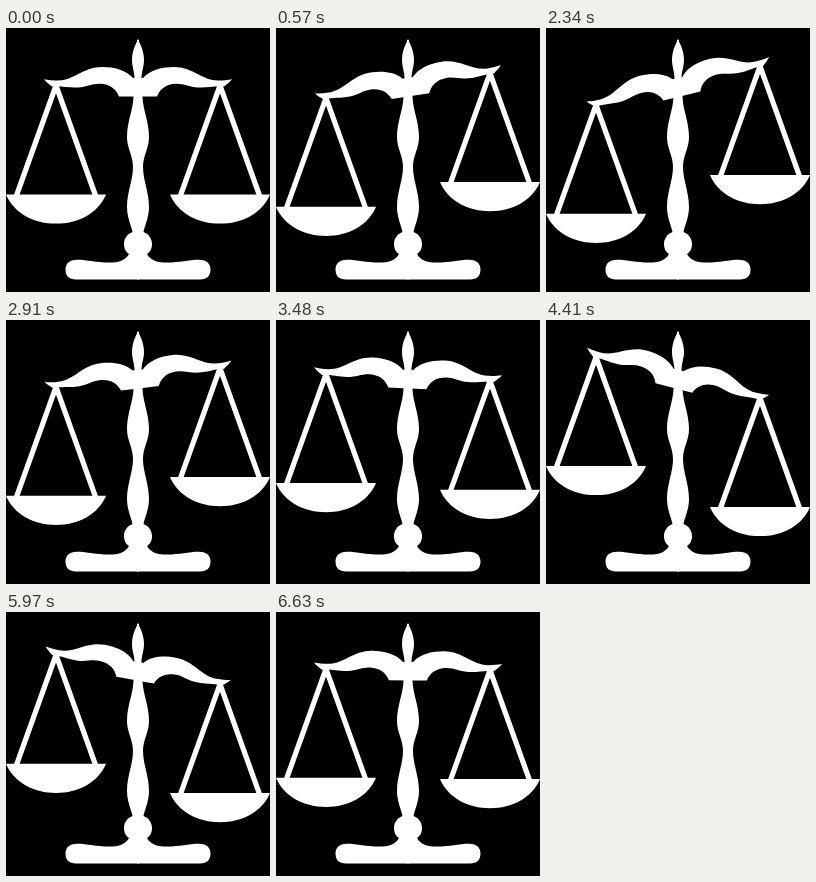
Recreate the animation shown at these times as an HTML page with a canvas. Size 264 by 264 pixels, loop 6.66 s.

```html
<!DOCTYPE html>
<html lang="en">
<head>
<meta charset="utf-8">
<title>Balance scales</title>
<style>
  html, body { margin: 0; width: 100%; height: 100%; overflow: hidden; background: #000; }
  canvas { display: block; width: 100vw; height: 100vh; }
</style>
</head>
<body>
<canvas id="stage" width="264" height="264"></canvas>
<script>
const ctx = document.getElementById('stage').getContext('2d');
const LOOP = 6660, STEP = 30;
const SWING = 17 * Math.PI / 180;
const CX = 132, PIVOT_Y = 52, ARM = 82;

// Left halves, x measured from the centre line.
const beam = new Path2D(`M1 -2 L-5 -2 C-12 -10 -24 -13 -36 -13
  C-55 -13 -64 0.5 -80 0.5 C-85 0.5 -90 0 -94 -0.8 C-92 2 -89 4 -86 6.5
  C-77 5.5 -70 8 -60 7.5 C-51 7 -46 3.5 -38 3.8 C-28 4.2 -22 9 -19 16.4
  L1 16.4 Z`);

const post = new Path2D(`M1 12 L0 11.5 C-3 17 -6 24 -6 32 C-6 38 -4 42 -3.5 49
  L-4.5 69 C-5 82 -11 94 -11 109 C-11 121 -5 127 -5 139
  C-5 152 -11 164 -11 179 C-11 189 -7 197 -5.5 204
  C-11 206 -14 211 -14 216 C-14 221 -12 224 -9 226
  C-13 233 -20 234.5 -29 234.5 C-42 234.5 -50 231.7 -61 231.7
  C-69 231.7 -72.5 236 -72.5 241.5 C-72.5 248 -69 251.5 -62 251.5 L1 251.5 Z`);

const pan = new Path2D(`M-50 109.4 C-42 128.4 -22 138.6 0 138.6 C22 138.6 42 128.4 50 109.4 Z`);
const cords = new Path2D('M-39.7 111 L0 0.5 L39.7 111');

function mirrored(path) {
  for (const side of [1, -1]) {
    ctx.save();
    ctx.scale(side, 1);
    ctx.fill(path);
    ctx.restore();
  }
}

function hang(x, y) {
  ctx.save();
  ctx.translate(x, y);
  ctx.stroke(cords);
  ctx.fill(pan);
  ctx.restore();
}

function draw(ms) {
  const tilt = SWING * Math.sin(2 * Math.PI * ms / LOOP);
  const drop = ARM * Math.sin(tilt);

  ctx.fillStyle = '#000';
  ctx.fillRect(0, 0, 264, 264);
  ctx.fillStyle = ctx.strokeStyle = '#fff';
  ctx.lineWidth = 5.2;
  ctx.lineJoin = 'round';

  ctx.save();
  ctx.translate(CX, 0);
  mirrored(post);
  ctx.translate(0, PIVOT_Y);
  ctx.rotate(-tilt);
  mirrored(beam);
  ctx.restore();

  hang(CX - ARM, 57 + drop);
  hang(CX + ARM, 57 - drop);
}

let start;
function tick(now) {
  start ??= now;
  draw(Math.floor(((now - start) % LOOP) / STEP) * STEP);
  requestAnimationFrame(tick);
}
draw(0);
requestAnimationFrame(tick);
</script>
</body>
</html>
```
